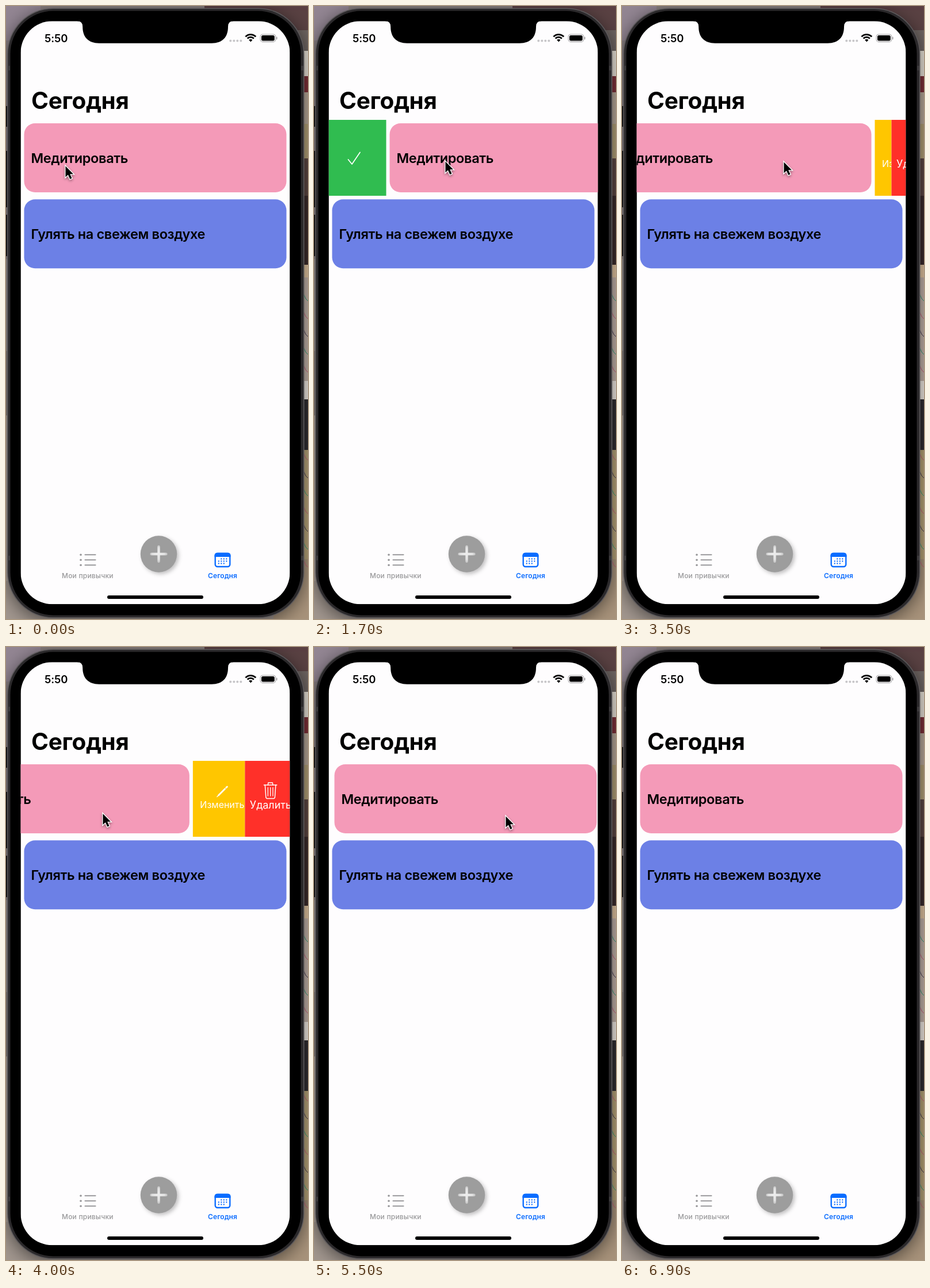
These frames come from a looping animation (525 px wide and 1066 px high, 7000 ms). An HTML page with a canvas:

```html
<!DOCTYPE html>
<html lang="ru">
<head>
<meta charset="utf-8">
<title>Сегодня</title>
<style>
html, body { margin: 0; width: 100%; height: 100%; overflow: hidden; background: #8d827e; }
canvas { display: block; width: 525px; height: 1066px; }
</style>
</head>
<body>
<canvas id="stage" width="525" height="1066"></canvas>
<script>
const ctx = document.getElementById('stage').getContext('2d');
const LOOP = 7000, STEP = 100;
const FONT = 'Inter, "Noto Sans", sans-serif';
const LEFT = 25.5, RIGHT = 493.5, TOP = 26.3, BOTTOM = 1040.3;

// Pointer track: time, x, y
const POINTER = [
  [0, 102, 276], [700, 102, 276], [900, 126, 268], [1500, 227, 268],
  [1800, 227, 268], [2500, 128, 269], [2700, 128, 269], [3200, 334, 269],
  [3500, 280, 269], [4200, 139, 292], [4700, 139, 292], [5500, 332, 292],
  [5800, 332, 292], [6300, 545, 330]
];
// Card track: time, offset
const CARD = [
  [0, 0], [900, 0], [1500, 100], [1800, 100], [2500, -1], [2600, -1], [2700, 0],
  [3200, 0], [3500, -54], [4200, -197], [4700, -197], [5500, 4], [5700, 0]
];

const ease = p => p * p * (3 - 2 * p);

function track(keys, t, col = 1) {
  let i = 0;
  while (i < keys.length - 1 && keys[i + 1][0] <= t) i++;
  const a = keys[i], b = keys[i + 1];
  if (!b) return a[col];
  return a[col] + (b[col] - a[col]) * ease((t - a[0]) / (b[0] - a[0]));
}

function box(x, y, w, h, color) {
  ctx.fillStyle = color;
  ctx.fillRect(x, y, w, h);
}

function round(x, y, w, h, r, color) {
  ctx.fillStyle = color;
  ctx.beginPath();
  ctx.roundRect(x, y, w, h, r);
  ctx.fill();
}

function dot(x, y, r, color) {
  ctx.fillStyle = color;
  ctx.beginPath();
  ctx.arc(x, y, r, 0, Math.PI * 2);
  ctx.fill();
}

function line(points, width, color, cap = 'round') {
  ctx.strokeStyle = color;
  ctx.lineWidth = width;
  ctx.lineCap = cap;
  ctx.lineJoin = 'round';
  ctx.beginPath();
  points.forEach(([x, y]) => ctx.lineTo(x, y));
  ctx.stroke();
}

function text(str, x, y, size, weight, color, spacing = 0) {
  ctx.font = `${weight} ${size}px ${FONT}`;
  ctx.letterSpacing = spacing + 'px';
  ctx.fillStyle = color;
  ctx.fillText(str, x, y);
}

function bands(x, w, list) {
  list.forEach(([y, color], i) => {
    const end = i + 1 < list.length ? list[i + 1][0] : 1066;
    box(x, y, w, end - y, color);
  });
}

function backdrop() {
  box(0, 0, 525, 1066, '#958a86');
  bands(0, 60, [[0, '#938693'], [60, '#8a8083'], [440, '#9d938f'], [600, '#8a817d'], [712, '#b0a49b'], [1000, '#a2978f']]);
  bands(465, 60, [
    [0, '#5a4243'], [42, '#6d6461'], [78, '#e5dfd4'], [122, '#7c3038'], [150, '#b5a596'],
    [205, '#b09e76'], [265, '#5b4642'], [330, '#3a2b2c'], [450, '#dcc09d'], [472, '#bfafa5'],
    [652, '#ece5de'], [684, '#302d31'], [772, '#b4a177'], [962, '#a8937b']
  ]);
  const tints = ['#2f9b76', '#c45a78', '#40364e'];
  for (let i = 0; i < 14; i++) {
    const y = (i < 6 ? 500 : 560) + i * 31;
    if (y > 650 && y < 775) continue;
    line([[517, y], [521, y + 9], [526, y + 14]], 1, tints[i % 3]);
  }
  box(60, 0, 285, 8, '#8a807f');
  box(345, 0, 180, 8, '#5a4043');
  box(60, 1058, 405, 8, '#a0958e');
  // side buttons
  box(0, 174, 4, 36, '#171617');
  box(0, 252, 4, 98, '#171617');
  box(0, 363, 4, 72, '#171617');
}

function body() {
  ctx.save();
  ctx.shadowColor = 'rgba(0,0,0,.5)';
  ctx.shadowBlur = 30;
  ctx.shadowOffsetY = 6;
  round(2, 3.5, 516.5, 1061, 80, '#5d5a5c');
  ctx.restore();
  round(3.5, 5, 513.5, 1058, 78.5, '#2b292b');
  round(7.5, 8.5, 505, 1051, 75, '#000');
  for (const y of [104, 956]) {
    box(3, y, 4, 8, '#3c3a3c');
    box(513, y, 4, 8, '#3c3a3c');
  }
}

function notch() {
  ctx.fillStyle = '#000';
  ctx.beginPath();
  ctx.moveTo(124, 25);
  ctx.lineTo(124, TOP);
  ctx.quadraticCurveTo(133.2, TOP, 133.2, 36);
  ctx.bezierCurveTo(133.2, 54, 143, 64.7, 162, 64.7);
  ctx.lineTo(357.5, 64.7);
  ctx.bezierCurveTo(376.5, 64.7, 386, 54, 386, 36);
  ctx.quadraticCurveTo(386, TOP, 395, TOP);
  ctx.lineTo(395, 25);
  ctx.fill();
}

function statusBar() {
  text('5:50', 67, 63, 18.5, 600, '#000', -0.1);
  for (let i = 0; i < 4; i++) dot(390.3 + i * 6, 60.5, 2, '#c6c5c8');
  // wifi fan
  ctx.lineCap = 'butt';
  ctx.strokeStyle = '#000';
  for (const r of [12.4, 7.8]) {
    ctx.lineWidth = 2.8;
    ctx.beginPath();
    ctx.arc(425.3, 62, r, -Math.PI * 0.755, -Math.PI * 0.245);
    ctx.stroke();
  }
  ctx.fillStyle = '#000';
  ctx.beginPath();
  ctx.moveTo(425.3, 62.6);
  ctx.arc(425.3, 62, 4.3, -Math.PI * 0.755, -Math.PI * 0.245);
  ctx.fill();
  // battery
  ctx.strokeStyle = '#a3a2a4';
  ctx.lineWidth = 1.1;
  ctx.beginPath();
  ctx.roundRect(442.2, 49.2, 26.5, 13.2, 4);
  ctx.stroke();
  round(444, 51, 22.8, 9.6, 2.5, '#000');
  round(469.8, 53.6, 1.7, 4.6, 1, '#a3a2a4');
}

function tabBar() {
  const gray = '#98989a', blue = '#0a6cff';
  for (const y of [954.2, 963.2, 972.3]) {
    dot(130, y, 1.8, gray);
    line([[137.5, y], [155.5, y]], 2.1, gray);
  }
  text('Мои привычки', 97, 995, 12, 500, gray, 0.2);

  ctx.save();
  ctx.shadowColor = 'rgba(0,0,0,.25)';
  ctx.shadowBlur = 7;
  ctx.shadowOffsetX = ctx.shadowOffsetY = 3;
  dot(265.5, 953, 31.7, '#9d9d9d');
  ctx.restore();
  const shine = ctx.createRadialGradient(264, 951, 2, 265.5, 953, 16);
  shine.addColorStop(0, '#ececec');
  shine.addColorStop(0.6, '#e2e2e2');
  shine.addColorStop(1, '#bcbcbc');
  line([[252.5, 953], [278.5, 953]], 4.4, shine);
  line([[265.5, 940], [265.5, 966]], 4.4, shine);

  ctx.strokeStyle = blue;
  ctx.lineWidth = 2.4;
  ctx.beginPath();
  ctx.roundRect(363.7, 952, 25.6, 23, 4);
  ctx.stroke();
  round(362.5, 950.8, 28, 7.2, [4.5, 4.5, 0, 0], blue);
  for (let r = 0; r < 3; r++) {
    for (let c = 0; c < 4; c++) {
      if ((r === 0 && c === 0) || (r === 2 && c === 3)) continue;
      dot(369.8 + c * 4.5, 961.5 + r * 4, 1.15, blue);
    }
  }
  text('Сегодня', 351, 995, 12, 600, blue, 0.1);
  round(176, 1025, 167, 6, 3, '#000');
}

function card(x, y, color, label) {
  round(x, y, 456, 120, 19, color);
  text(label, x + 12, y + 68.5, 23.5, 600, '#000', -0.35);
}

function doneAction(off) {
  box(LEFT, 198, off, 132, '#30bc50');
  ctx.save();
  ctx.beginPath();
  ctx.rect(LEFT, 198, off, 132);
  ctx.clip();
  const x = LEFT + off - 100;
  line([[x + 34, 267], [x + 40.5, 275], [x + 54.5, 254.5]], 1.7, '#fff');
  ctx.restore();
}

function pencil(x) {
  line([[x + 44, 258.5], [x + 56.5, 246]], 2.8, '#fff', 'butt');
  line([[x + 58, 244.5], [x + 59.5, 243]], 3, '#fff');
  line([[x + 42, 260.5], [x + 44, 258.5]], 1.3, '#fff');
}

function trash(x) {
  const white = '#fff';
  line([[x + 33, 240], [x + 55.5, 240]], 1.5, white);
  line([[x + 40, 240], [x + 40.5, 236], [x + 48, 236], [x + 48.5, 240]], 1.5, white);
  line([[x + 35, 240], [x + 36.5, 262], [x + 38, 263.4], [x + 50.5, 263.4], [x + 52, 262], [x + 53.5, 240]], 1.5, white);
  for (const d of [40, 44.3, 48.6]) line([[x + d, 244.5], [x + d, 259]], 1.3, white);
}

function rowActions(off) {
  const edge = RIGHT + off, mid = edge - off * 106 / 197.5;
  box(edge, 198, mid - edge, 132, '#ffc600');
  ctx.save();
  ctx.beginPath();
  ctx.rect(edge, 198, mid - edge, 132);
  ctx.clip();
  pencil(edge);
  text('Изменить', edge + 12.5, 279.5, 16, 400, '#fff');
  ctx.restore();
  box(mid, 198, RIGHT - mid, 132, '#ff3029');
  trash(mid);
  text('Удалить', mid + 8.5, 281, 18, 400, '#fff');
}

function pointer(x, y) {
  ctx.save();
  ctx.translate(x + 0.7, y + 1);
  ctx.beginPath();
  [[0.8, 1.5], [0.8, 20.5], [5.2, 16.5], [8.6, 24], [11.8, 22.6], [8.5, 15.3], [14.3, 15.3]]
    .forEach(([px, py]) => ctx.lineTo(px, py));
  ctx.closePath();
  ctx.lineJoin = 'miter';
  ctx.lineWidth = 2.6;
  ctx.strokeStyle = '#fff';
  ctx.shadowColor = 'rgba(0,0,0,.4)';
  ctx.shadowBlur = 4;
  ctx.shadowOffsetY = 2;
  ctx.stroke();
  ctx.shadowColor = 'transparent';
  ctx.fillStyle = '#000';
  ctx.fill();
  ctx.restore();
}

function draw(t) {
  const off = track(CARD, t);
  backdrop();
  body();
  ctx.save();
  ctx.beginPath();
  ctx.roundRect(LEFT, TOP, RIGHT - LEFT, BOTTOM - TOP, 55);
  ctx.clip();
  box(LEFT, TOP, RIGHT - LEFT, BOTTOM - TOP, '#fefdfe');
  statusBar();
  text('Сегодня', 44, 179, 40.5, 700, '#000', -0.3);
  // actions show only during their own swipe, not while the row settles
  if (off > 0 && t < 2500) doneAction(off);
  if (off < 0 && t > 3200) rowActions(off);
  card(31.5 + off, 204, '#f49ab8', 'Медитировать');
  card(31.5, 336.3, '#6c80e6', 'Гулять на свежем воздухе');
  tabBar();
  ctx.restore();
  notch();
  if (t < 6300) pointer(track(POINTER, t), track(POINTER, t, 2));
}

const start = performance.now();
function frame() {
  const t = (performance.now() - start) % LOOP;
  draw(Math.floor(t / STEP) * STEP);
  requestAnimationFrame(frame);
}
frame();
</script>
</body>
</html>
```
